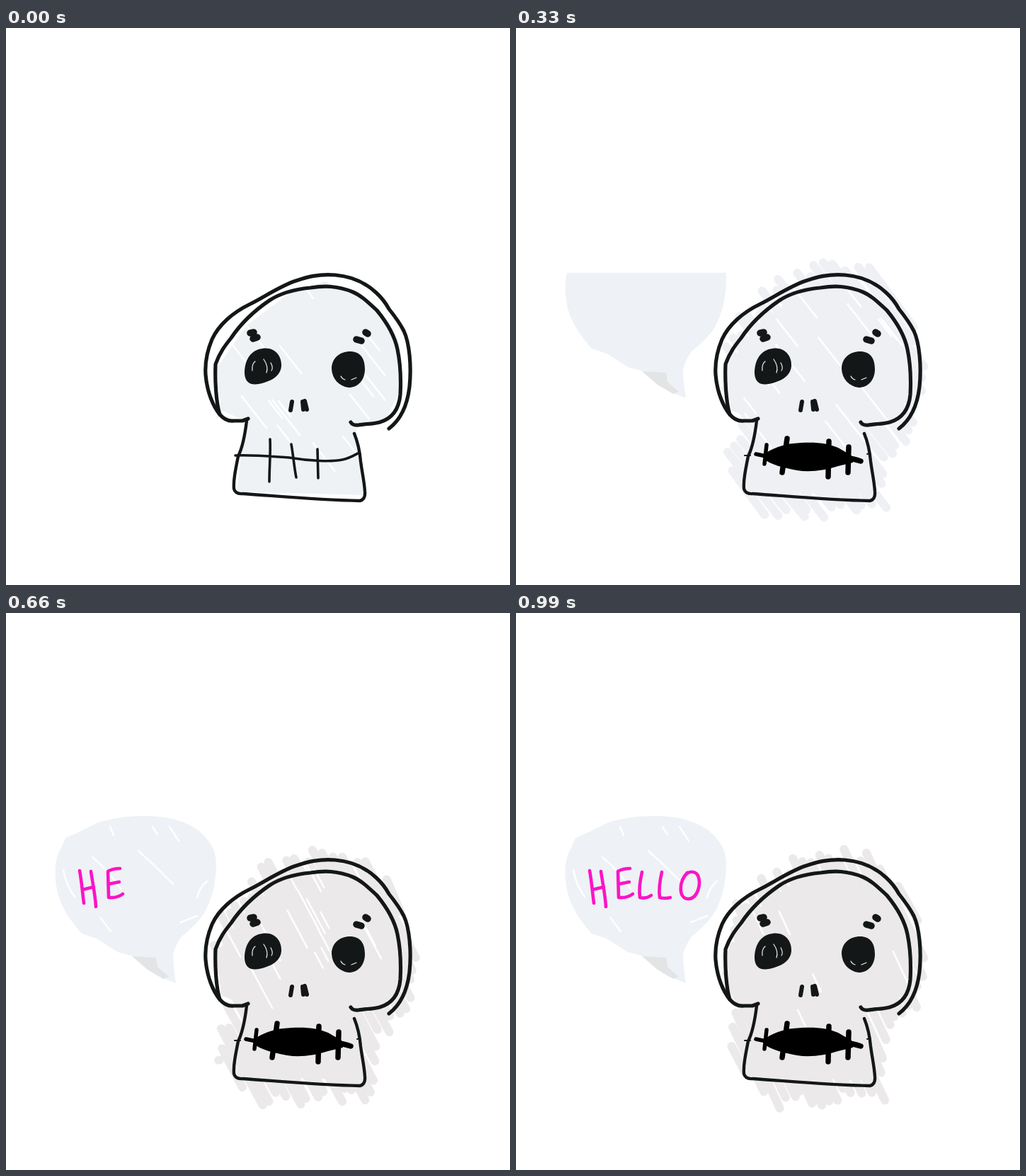
An HTML page for the animation above (1100 ms loop, 712 by 787 pixels).

```html
<!DOCTYPE html>
<html lang="en">
<head>
<meta charset="utf-8">
<title>Skull says hello</title>
<style>
html, body { margin: 0; width: 100%; height: 100%; overflow: hidden; background: #fff; }
svg { display: block; width: 100%; height: 100%; }
path { fill: none; stroke-linecap: round; stroke-linejoin: round; }
.ink { stroke: #141717; stroke-width: 5.2; }
.solid { fill: #141717; }
.black { stroke: #000; stroke-width: 7.5; }
.white { stroke: #fff; stroke-width: 2.5; }
.pink { stroke: #fb14c6; stroke-width: 4.6; }
.paper { fill: #eef1f5; }
.shade { fill: #e3e4e6; }
.half { clip-path: inset(25% 0 0 0); }
[data-on] { visibility: hidden; animation: 1.1s step-end infinite; }
</style>
</head>
<body>
<!-- data-on: first and last tenth of the loop in which a part is seen -->
<svg viewBox="0 0 712 787">
  <g id="shading"></g>

  <!-- speech bubble -->
  <path class="paper" data-on="2 3" d="M76 381Q78 369 86 376C95 404 105 421 125 432L150 426L178 446L215 433L240 433L262 425L271 390L290 375L295 347L286 332Q292 321 302 330L312 350L308 390L315 400L290 425L268 470L236 480L240 523L180 485C130 470 97 440 76 381Z"/>
  <g data-on="3 4"><use href="#bubble" class="half"/></g>
  <g data-on="4 10">
    <path id="bubble" class="paper" d="M78 332L84 318L104 309L128 297C150 289 180 286 205 287C235 288 262 297 277 312C292 326 297 338 297 357C296 385 291 405 280 424C271 438 258 449 248 457Q240 468 236 482Q236 500 240 523L222 516L180 485L158 479L128 460L107 453C92 436 75 412 72 390C67 366 70 344 78 332Z"/>
    <path class="white" d="M122 345Q145 364 162 390M187 336Q212 358 236 383M81 363Q85 385 97 401M133 430L148 450M231 302L244 322M207 302L214 313M147 302L152 314M270 402Q273 388 284 379M247 437L270 428"/>
  </g>
  <path class="shade" data-on="1 10" d="M178 485L212 487L214 500L230 514L222 517L200 504Z"/>

  <!-- skull -->
  <path class="ink" d="M541 566C558 553 567 533 570 507C573 478 570 445 562 428C556 416 549 407 541 397Q534 384 523 374C508 360 490 351 465 349C442 347 425 352 410 357C388 364 365 380 345 390C320 402 300 420 291 440C283 459 281 475 282 490C284 515 293 535 302 546C308 553 315 556 322 555L334 555L342 552"/>
  <path class="ink" d="M302 546C297 530 295 500 296 475C302 458 310 448 318 438C330 420 350 400 372 385C390 373 410 369 430 367C450 364 468 364 490 373C502 378 512 388 524 399C538 416 549 434 553 454C558 478 558 500 557 518C555 540 545 552 528 557C517 560 507 559 498 561Q490 562 487 557"/>
  <path class="ink" style="stroke-width:4.4" d="M340 555C337 580 333 595 328 605C324 625 321 640 322 651Q324 659 335 658C380 661 440 667 500 668Q508 666 507 655C506 640 503 628 501 612Q499 590 492 573"/>
  <path class="ink" style="stroke-width:9.5" d="M345 431L350 430M349 439L355 437M495 440L502 442M508 430L511 432"/>
  <path class="ink" style="stroke-width:6" d="M404 528L402 540M419 528L420 539M422 527L425 539"/>
  <path class="solid" d="M337 488C337 470 345 455 362 453C378 450 390 462 389 478C388 490 378 497 365 501C352 505 338 506 337 488ZM460 482C460 466 472 457 486 457C500 457 507 466 507 482C507 498 497 508 484 508C470 506 461 496 460 482Z"/>
  <path style="stroke:#eceef1;stroke-width:1.2" d="M348 484Q347 475 352 471M364 468Q371 478 368 487M374 473Q378 480 375 484M473 492Q475 496 479 497M488 497L495 494"/>

  <!-- mouth, closed then open -->
  <path class="ink" style="stroke-width:3.6" data-on="0 1" d="M324 604C350 603 370 605 400 607C430 612 460 613 475 610C485 608 490 605 497 601M373 581C374 600 372 620 372 641M403 588C406 605 407 620 410 635M440 595L441 636"/>
  <g data-on="1 10">
    <path class="ink" style="stroke-width:2" d="M323 604L331 604M496 602L500 601"/>
    <path style="fill:#000" d="M349 603C362 594 378 588 392 587C418 584 440 586 455 593L474 604L476 614L455 619C437 625 415 628 397 625C380 622 360 617 350 609Z"/>
    <path class="black" style="stroke-width:5.5" d="M339 602L353 605M354 589L351 616"/>
    <path class="black" d="M383 580L376 628M442 584L441 634M470 592L469 628M462 606Q478 609 487 612"/>
  </g>

  <!-- lettering -->
  <path class="pink" data-on="5 10" d="M104 364C107 380 108 395 110 410M120 365C122 380 126 397 127 415M108 391L124 387"/>
  <path class="pink" data-on="6 10" d="M161 361Q151 361 144 365L145 402Q157 403 165 397M145 383L160 380"/>
  <path class="pink" data-on="7 10" d="M178 366Q173 388 175 402Q184 404 191 399"/>
  <path class="pink" data-on="8 10" d="M206 366Q201 388 203 402Q210 404 218 402"/>
  <path class="pink" data-on="9 10" d="M242 367C230 379 229 403 243 404C257 404 262 382 257 371C253 364 244 364 239 371"/>
</svg>

<script>
const SKULL = '298 480,340 420,400 375,450 358,515 385,550 440,558 510,535 555,494 562,505 660,326 655,338 555,304 540';
const REACH = '290 500,305 425,360 362,440 332,510 345,560 410,580 490,570 555,525 605,520 685,430 690,360 695,292 625,312 555';
const COOL = '#eff0f4', WARM = '#ece9ea';

const shading = document.getElementById('shading');

function add(parent, tag, attrs) {
  const el = document.createElementNS('http://www.w3.org/2000/svg', tag);
  for (const k in attrs) el.setAttribute(k, attrs[k]);
  return parent.appendChild(el);
}

function seeded(seed) {
  return () => (seed = (seed * 16807) % 2147483647) / 2147483647;
}

// Parallel strokes across a polygon, drawn in axes turned by angle a
function hatch(edge, a, w, rnd) {
  const cos = Math.cos(a), sin = Math.sin(a);
  const pts = edge.split(',').map(p => {
    const [x, y] = p.split(' ').map(Number);
    return [x * cos + y * sin, y * cos - x * sin];
  });
  const ys = pts.map(p => p[1]), end = Math.max(...ys);
  const jitter = size => (rnd() - .5) * size;
  let d = '';
  for (let y = Math.min(...ys) + w / 2; y < end; y += w + jitter(4)) {
    const xs = [];
    pts.forEach((p, i) => {
      const q = pts[(i + 1) % pts.length];
      if (p[1] > y !== q[1] > y) xs.push(p[0] + (y - p[1]) * (q[0] - p[0]) / (q[1] - p[1]));
    });
    xs.sort((m, n) => m - n);
    for (let i = 0; i + 1 < xs.length; i += 2) {
      const l = xs[i] + w / 2 + jitter(24), r = xs[i + 1] - w / 2 + jitter(24), tilt = jitter(5);
      if (r > l) d += `M${l} ${y - tilt}L${r} ${y + tilt}`;
    }
  }
  return d;
}

// Thin slits left open between the strokes
function slits(count, a, rnd) {
  let d = '';
  while (count--) {
    const t = rnd() * 2 * Math.PI, r = 125 * Math.sqrt(rnd()), len = 15 + 55 * rnd();
    const x = 415 + r * Math.cos(t), y = 480 + r * Math.sin(t);
    d += `M${x} ${y}l${len * Math.cos(a)} ${len * Math.sin(a)}`;
  }
  return d;
}

// The skull is shaded afresh in every tenth of the loop
for (let i = 0; i < 10; i++) {
  const rnd = seeded(71 + i * 1301);
  const color = i === 0 ? '#eef2f5' : i < 6 ? COOL : WARM;
  const deg = i < 6 ? 52 : 56 + i, a = deg * Math.PI / 180;
  const g = add(shading, 'g', { 'data-on': `${i} ${i + 1}` });
  add(g, 'polygon', { points: SKULL, fill: color });
  if (i) add(g, 'path', {
    d: hatch(REACH, a, 12, rnd),
    transform: `rotate(${deg})`,
    style: `stroke:${color};stroke-width:12`
  });
  add(g, 'path', { class: 'white', d: slits(i === 9 ? 5 : 16, a, rnd) });
}

// One stepped keyframe rule per visible span
const rules = new Set();
for (const el of document.querySelectorAll('[data-on]')) {
  const [from, to] = el.dataset.on.split(' ').map(Number);
  const name = `on${from}to${to}`;
  el.style.animationName = name;
  rules.add(`@keyframes ${name} { 0% { visibility: hidden } ${from * 10}% { visibility: visible } ${
    to < 10 ? to * 10 + '% { visibility: hidden }' : ''} }`);
}
document.head.appendChild(document.createElement('style')).textContent = [...rules].join('\n');
</script>
</body>
</html>
```
